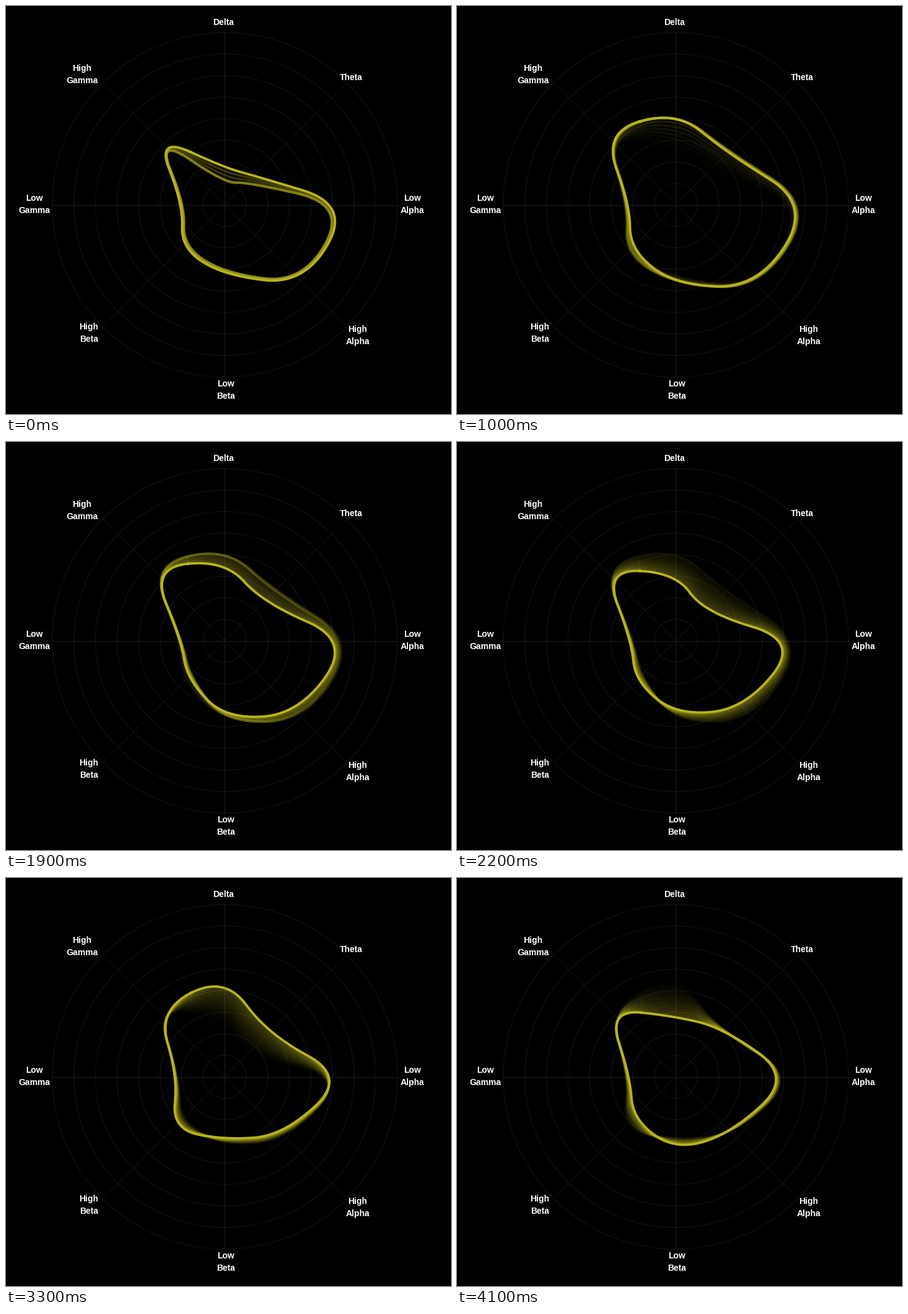
Recreate the animation shown at these times as a matplotlib script. Size 725 by 666 pixels, loop 4.2 s.

```python
import numpy as np
import matplotlib.pyplot as plt
from matplotlib.animation import FuncAnimation

W, H, DPI = 725, 666, 100
PX = 72 / DPI                      # one pixel in points
FRAMES, STEP = 42, 100             # frame count, ms per frame
CX, CY = 356.5, 324.5
RING, RINGS = 35.15, 8
TRAIL, TRAIL_STEP = 13, 60         # older outlines, ms between them
FIRST, PERIOD = -190, 890          # ms of the first reading, ms between readings
YELLOW = "#b8b31e"

# Bands run clockwise from the top; on diagonals a level is the offset per axis.
BANDS = ["Delta", "Theta", "Low Alpha", "High Alpha",
         "Low Beta", "High Beta", "Low Gamma", "High Gamma"]
DIRS = np.array([(0, -1), (1, -1), (1, 0), (1, 1),
                 (0, 1), (-1, 1), (-1, 0), (-1, -1)])
READINGS = np.array([
    (35, 37, 199, 128, 112, 68, 65, 111),
    (154, 87, 226, 138, 130, 83, 78, 116),
    (153, 79, 210, 129, 134, 57, 69, 123),
    (92, 31, 199, 104, 115, 70, 74, 114),
    (171, 73, 199, 95, 102, 87, 77, 109),
    (83, 80, 187, 91, 124, 66, 74, 111),
])


def levels_at(ms):
    """Move evenly from each reading to the next."""
    pos = np.clip((ms - FIRST) / PERIOD, 0, len(READINGS) - 1)
    i = min(int(pos), len(READINGS) - 2)
    return READINGS[i] + (pos - i) * (READINGS[i + 1] - READINGS[i])


U = np.linspace(0, 1, 24, endpoint=False)[None, :, None]


def outline(ms):
    """Closed quadratic curve through the midpoints of the band points."""
    p = DIRS * levels_at(ms)[:, None] + (CX, CY)
    a = ((p + np.roll(p, 1, axis=0)) / 2)[:, None]
    b = ((p + np.roll(p, -1, axis=0)) / 2)[:, None]
    c = p[:, None]
    pts = (1 - U) ** 2 * a + 2 * U * (1 - U) * c + U ** 2 * b
    pts = pts.reshape(-1, 2)
    return np.vstack([pts, pts[:1]]).T


fig = plt.figure(figsize=(W / DPI, H / DPI), dpi=DPI, facecolor="black")
ax = fig.add_axes([0, 0, 1, 1])
ax.set_xlim(0, W)
ax.set_ylim(H, 0)
ax.axis("off")

# Grid
turn = np.linspace(0, 2 * np.pi, 361)
for k in range(1, RINGS + 1):
    r = k * RING
    ax.plot(CX + r * np.cos(turn), CY + r * np.sin(turn),
            color="#151515", lw=PX)
for dx, dy in DIRS:
    r = RING * RINGS / np.hypot(dx, dy)
    shade = "#111111" if dx and dy else "#1e1e1e"
    ax.plot([CX, CX + r * dx], [CY, CY + r * dy], color=shade, lw=PX)

# Label centres, one line of text per word
SPOTS = [(354, 26), (562, 116), (662, 313), (573, 527),
         (358, 616), (135, 523), (46, 313), (124, 101)]
for (x, y), band in zip(SPOTS, BANDS):
    for row, word in enumerate(band.split()):
        ax.text(x, y + 20 * row + 5, word, color="white", ha="center",
                va="baseline", family="Liberation Sans", weight="bold",
                size=14 * PX, zorder=5)

# Oldest outline first, the current one on top
ages = range(TRAIL, -1, -1)
lines = []
for age in ages:
    alpha = 0.34 * (1 - age / (TRAIL + 1)) ** 1.5 if age else 1
    line, = ax.plot([], [], color=YELLOW, lw=4 * PX, alpha=alpha,
                    solid_joinstyle="round", zorder=3)
    lines.append(line)


def update(frame):
    now = frame * STEP
    for age, line in zip(ages, lines):
        line.set_data(*outline(now - age * TRAIL_STEP))
    return lines


anim = FuncAnimation(fig, update, frames=FRAMES, interval=STEP,
                     repeat=True, repeat_delay=0, blit=False)
plt.show()
```
